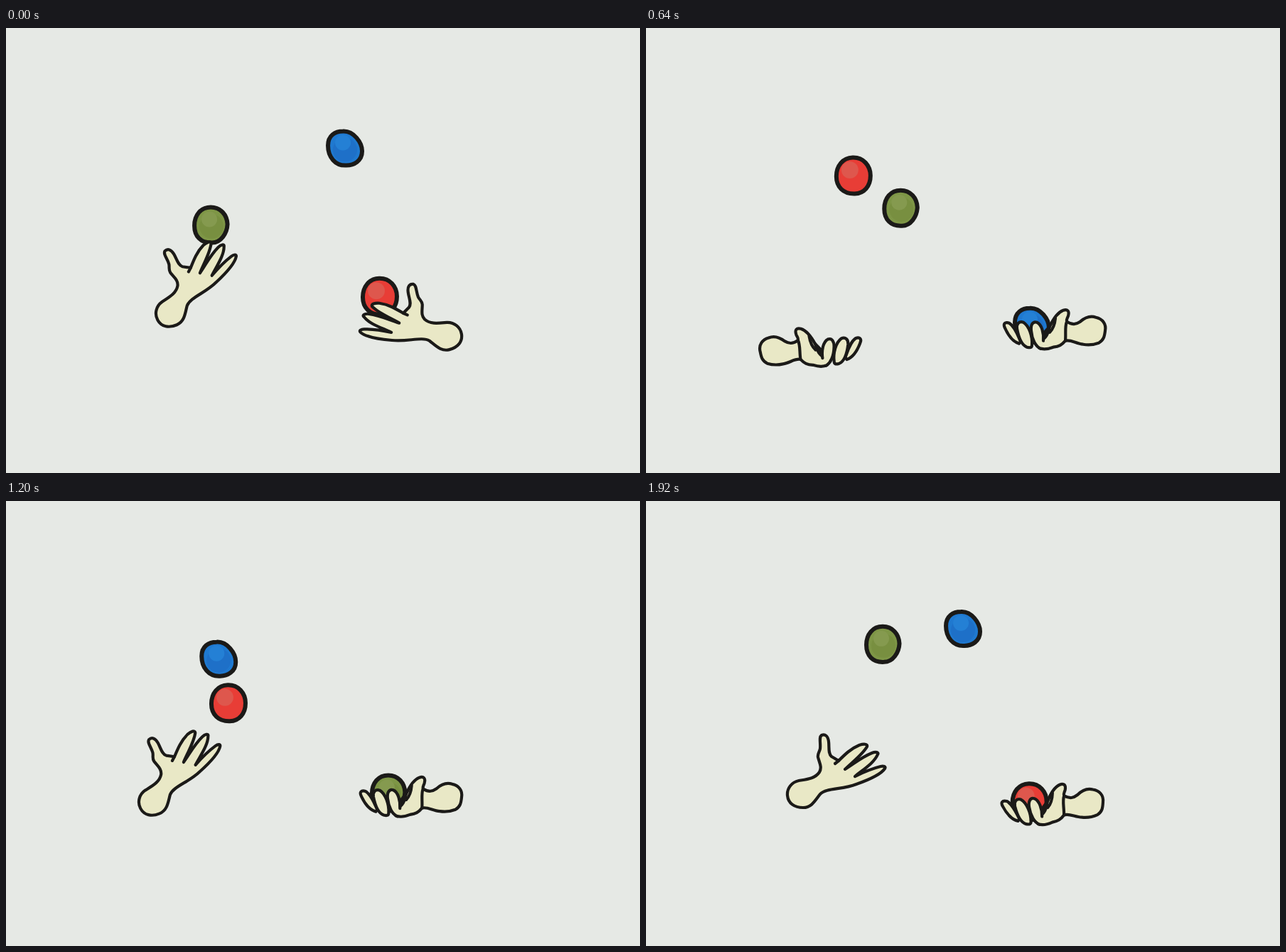
Recreate the animation shown at these times as an HTML page. Size 892 by 627 pixels, loop 2 s.

```html
<!DOCTYPE html>
<html lang="en">
<head>
<meta charset="utf-8">
<title>Juggling hands</title>
<style>
  html, body { margin: 0; width: 100%; height: 100%; overflow: hidden; background: #e6e9e5; }
  svg { display: block; width: 892px; height: 627px; }
  .ink { fill: #1b1a18; stroke: none; }
  .line { fill: none; }
  .hand { fill: #e9e8c6; stroke: #1b1a18; stroke-width: 4.2; stroke-linejoin: round; stroke-linecap: round; }
  .rim { stroke: #1b1a18; stroke-width: 6; }
</style>
</head>
<body>
<svg viewBox="0 0 892 627">
  <defs>
    <!-- Hands are drawn as left hands around the wrist; the right one is mirrored. -->
    <g id="palm">
      <path d="M29-83C25-80 28-72 27-64C26-59 23-57 24-52C26-44 30-38 26-31C20-22 9-21-3-19C-13-17-20-8-19 2C-18 13-9 19 3 19C15 19 20 9 27 0C36-9 58-6 78-14C95-20 112-27 118-36C120-39 116-40 112-39C100-36 88-31 76-25C88-35 103-44 108-56C110-59 105-60 100-58C85-52 75-43 62-35C72-45 87-56 93-67C94-71 88-71 82-69C70-64 62-56 53-47L43-53C38-57 40-66 39-74C38-82 34-85 29-83Z"/>
      <path class="line" d="M53-47L48-43"/>
    </g>
    <g id="cup">
      <path d="M33-13C25-8 20-9 14-13C6-20-2-21-8-19C-17-17-23-10-21 0C-20 8-19 13-12 17C-4 20 4 20 10 19C20 18 27 12 35 14C40 20 44 22 52 23C60 26 66 27 72 24L70 10C62 8 60 2 57-6C52-17 46-26 38-29C32-31 29-28 31-21C32-18 34-16 33-13Z"/>
      <path class="line" d="M33-13C36-6 34 4 35 14M49-18C50-8 53-2 57 2"/>
      <path class="ink" d="M55-12C55 0 59 10 66 14L67 2Z"/>
      <path d="M98 15C102 6 106-6 114-11C120-13 123-10 120-4C116 5 110 15 100 18Z"/>
      <path d="M82 20C81 8 86-7 94-12C100-14 104-10 103-3C101 8 97 20 89 23C85 24 82 24 82 20Z"/>
      <path d="M66 14C65 4 68-9 75-12C81-14 84-8 83 0C82 12 77 22 70 25"/>
    </g>
    <g id="back">
      <path d="M-20 2C-19 14-11 21-2 21C10 20 20 13 29 2C38-7 58-9 72-13C86-18 96-34 101-48C103-54 98-55 94-52C86-46 82-35 75-34C72-36 80-46 86-53C92-60 102-66 101-71C98-77 90-72 85-67C77-60 66-50 61-54C58-60 66-70 72-78C78-85 90-90 88-94C84-98 76-92 70-88C62-82 56-74 50-70C54-76 67-86 64-91C58-94 46-82 37-74C30-62 24-44 16-30C12-22 6-24-2-21C-14-18-21-8-20 2Z"/>
      <path class="ink" d="M25-46C18-36 12-26 11-17L16-22Z"/>
    </g>
  </defs>

  <g id="red">
    <path class="rim" fill="#e83d36" d="M-1-25.500C14-26 24-14 24 0C24 15 15 25 2 25.500C-14 26-24 16-24 1C-24-14-15-25-1-25.500Z"/>
    <circle cx="-5" cy="-8" r="12" fill="#de574d"/>
  </g>
  <g id="green">
    <path class="rim" fill="#7e9646" d="M0-25C14-25 23-14 23.500-1C23 12 14 25 2 25C-14 26-23 16-23 1C-23-14-14-25 0-25Z"/>
    <circle cx="1" cy="2" r="17" fill="#788f40"/>
    <circle cx="-2" cy="-8" r="11" fill="#859a4f"/>
  </g>
  <g id="blue">
    <path class="rim" fill="#1f79d0" d="M-3-24C12-25 24-8 24 4C24 18 12 24 2 24C-14 25-24 12-24-4C-24-18-14-24-3-24Z"/>
    <circle cx="0" cy="2" r="17" fill="#1e70c8"/>
    <circle cx="-3" cy="-8" r="11" fill="#2480d5"/>
  </g>
  <use id="left" class="hand"/>
  <use id="right" class="hand"/>
</svg>

<script>
const STEP = 80, COUNT = 25, GRAVITY = 9.35;

// Where each pose holds a ball, seen from the wrist.
const grip = { palm: [79, -78], cup: [82, -8], back: [79, -62] };

// A few key poses per hand: [step, pose, wrist x, wrist y, turn]
const hands = {
  left: { side: 1, keys: [
    [0, 'palm', 230, 402, -23.5], [5, 'palm', 193, 468, 0], [7, 'cup', 177, 470, 0],
    [10, 'palm', 195, 412, -13], [12, 'cup', 180, 445, 0], [15, 'palm', 206, 424, -22.5],
    [19, 'cup', 163, 453, 8], [21, 'cup', 180, 486, 0], [24, 'palm', 218, 413, 0]] },
  right: { side: -1, keys: [
    [0, 'palm', 622, 434, 14.5], [2, 'back', 600, 402, -5], [5, 'cup', 625, 417, -7],
    [7, 'cup', 632, 435, 0], [10, 'back', 605, 403, 0], [12, 'back', 588, 372, -16],
    [15, 'cup', 620, 418, 1], [19, 'back', 612, 453, 0], [21, 'back', 598, 397, -8],
    [24, 'cup', 622, 426, 4]] }
};

// Throws: first and last step in the air, time and place of the highest point, speed there.
const flights = {
  red: [
    { to: 'left', from: 2, until: 11, peak: 6.12, x: 322, y: 175, speed: -21, drag: 0.3 },
    { to: 'right', from: 14, until: 23, peak: 18.3, x: 408, y: 183, speed: 28.75 }],
  green: [
    { to: 'right', from: 8, until: 14, peak: 10.65, x: 414, y: 188, speed: 21 },
    { to: 'left', from: 21, until: 25, peak: 23.1, x: 373.5, y: 180, speed: -45, gravity: 27 }],
  blue: [
    { to: 'left', from: 10, until: 17, peak: 13.19, x: 326, y: 192, speed: -21.6, drag: 0.45 },
    { to: 'right', from: 22, until: 29, peak: 25.06, x: 478.6, y: 169.5, speed: 26.1, drag: 0.3 }]
};

function handAt({ side, keys }, step) {
  const i = keys.findLastIndex(k => k[0] <= step);
  const a = keys[i], b = keys[(i + 1) % keys.length];
  const u = (step - a[0]) / ((b[0] || COUNT) - a[0]);
  const ease = u * u * (3 - 2 * u);
  const [x, y, turn] = [2, 3, 4].map(c => a[c] + (b[c] - a[c]) * ease);
  return { side, x, y, turn, pose: (u < 0.5 ? a : b)[1] };
}

function held({ side, x, y, turn, pose }) {
  const [gx, gy] = grip[pose], r = turn * Math.PI / 180;
  return [x + side * (gx * Math.cos(r) - gy * Math.sin(r)), y + gx * Math.sin(r) + gy * Math.cos(r)];
}

function flying({ from, peak, x, y, speed, drag = 0.001, gravity = GRAVITY }, age) {
  const t = from + age - peak;
  return [x + speed * (1 - Math.exp(-drag * t)) / drag, y + gravity * t * t];
}

// A ball follows its latest throw, then rests in the hand that caught it.
function ballAt(throws, step, pose) {
  const age = f => (step - f.from + COUNT) % COUNT;
  const last = throws.reduce((a, b) => age(a) < age(b) ? a : b);
  const flight = age(last) <= last.until - last.from;
  return flight ? flying(last, age(last)) : held(pose[last.to]);
}

function place(id, transform) {
  const node = document.getElementById(id);
  node.setAttribute('transform', transform);
  return node;
}

function draw(now) {
  const step = Math.floor(now / STEP) % COUNT;
  const pose = {};
  for (const id in hands) {
    const h = pose[id] = handAt(hands[id], step);
    place(id, `translate(${h.x} ${h.y}) scale(${h.side} 1) rotate(${h.turn})`)
      .setAttribute('href', '#' + h.pose);
  }
  for (const id in flights)
    place(id, `translate(${ballAt(flights[id], step, pose)})`);
}

const start = performance.now();
function tick() {
  draw(performance.now() - start);
  requestAnimationFrame(tick);
}
tick();
</script>
</body>
</html>
```
